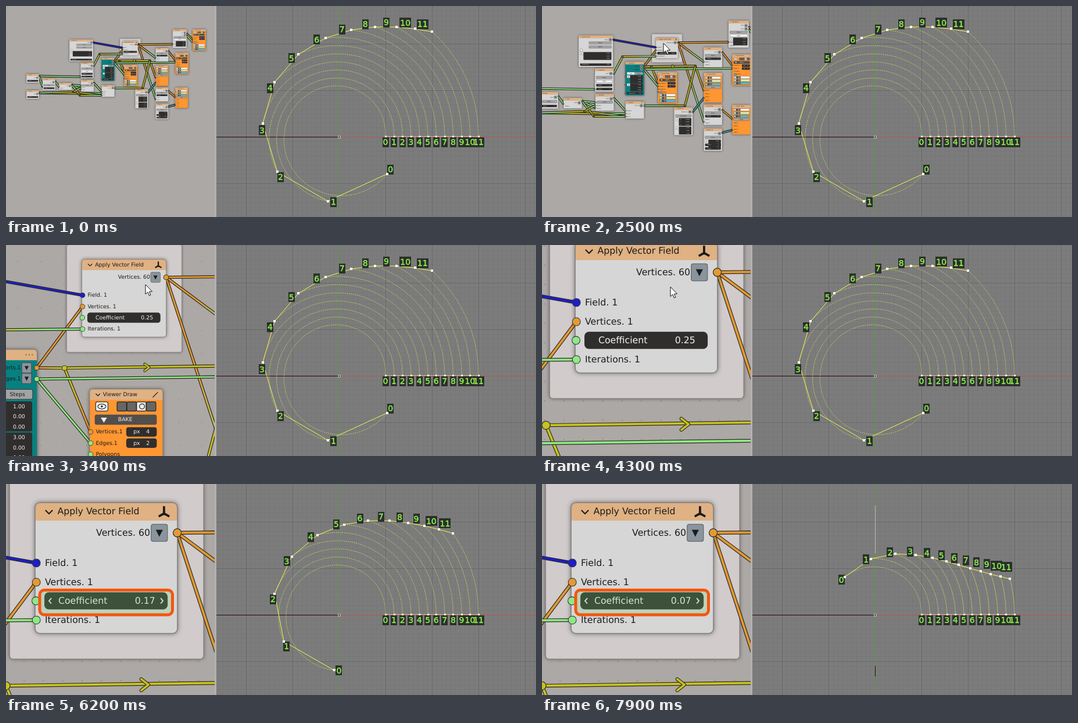
An HTML page with a canvas for the animation above (8000 ms loop, 912 by 363 pixels).

```html
<!DOCTYPE html>
<html lang="en">
<head>
<meta charset="utf-8">
<title>Vector field nodes</title>
<style>
html, body { margin: 0; width: 100%; height: 100%; overflow: hidden; background: #7c7c7c; }
canvas { display: block; width: 100vw; height: 100vh; }
</style>
</head>
<body>
<canvas id="stage" width="912" height="363"></canvas>
<script>
const ctx = document.getElementById('stage').getContext('2d');
const W = 912, H = 363, SPLIT = 359, LOOP = 8000;
const FONT = '"DejaVu Sans", sans-serif';
const WIRE = { o: '#e39a33', g: '#8ee886', y: '#c8c31e', b: '#1c1ec8', t: '#3aa3b0' };
const DARK = '#302e2d', GREY = '#a3a3a3', INK = '#1c1c1c', ORANGE = '#fe9632';

// Keyframes [time, ...values], linear between neighbours.
function track(t, keys) {
  if (t <= keys[0][0]) return keys[0].slice(1);
  for (let i = 1; i < keys.length; i++) {
    const a = keys[i - 1], b = keys[i];
    if (t <= b[0]) {
      const k = (t - a[0]) / (b[0] - a[0]);
      return b.slice(1).map((v, j) => a[j + 1] + (v - a[j + 1]) * k);
    }
  }
  return keys[keys.length - 1].slice(1);
}

const ZOOM = [[2200, .317], [2500, .46], [2700, .59], [2800, .59], [3100, 1], [3400, 1.75],
  [3600, 1.75], [3800, 2.25], [4100, 2.25], [4300, 2.95]].map(([t, s]) => [t, Math.log(s)]);
const OFFSET = [[.317, 144.8, 47], [.46, 114.8, 35], [1, 0, 0], [2.95, -463, -133]];
const PAN = [[4300, 0, 0], [4800, -7, 37]];
const POINTER = [[300, 821, 33], [1100, 242, 81], [1600, 230, 82], [1700, 230, 82], [2000, 209, 71],
  [2200, 209, 71], [2500, 209, 64], [2800, 210, 64], [3100, 247, 68], [3400, 240, 68],
  [4300, 221, 72], [4800, 215, 198]];
const COEFF = [[5000, .25], [5300, .24], [5800, .2], [6200, .17], [6700, .13], [7600, .08], [7900, .07]];
const STEP = [[4900, .1275], [5300, .1257], [5800, .108], [6200, .0937], [6700, .072], [7600, .046], [7900, .0391]];

let zoom = 1;

function box(x, y, w, h, r, fill, stroke) {
  ctx.beginPath();
  ctx.roundRect(x, y, w, h, r);
  if (fill) { ctx.fillStyle = fill; ctx.fill(); }
  if (stroke) { ctx.strokeStyle = stroke; ctx.stroke(); }
}

function poly(points, fill, stroke) {
  ctx.beginPath();
  points.forEach(([x, y]) => ctx.lineTo(x, y));
  if (fill) { ctx.closePath(); ctx.fillStyle = fill; ctx.fill(); }
  if (stroke) { ctx.strokeStyle = stroke; ctx.stroke(); }
}

function text(str, x, y, align = 'left', color = INK) {
  ctx.font = (zoom < 1.5 ? 4.9 : 5.35) + 'px ' + FONT;
  ctx.textAlign = align;
  ctx.textBaseline = 'middle';
  ctx.fillStyle = color;
  ctx.fillText(str, x, y + .2);
}

function dot(x, y, color) {
  ctx.beginPath();
  ctx.arc(x, y, 2.35, 0, 7);
  ctx.fillStyle = color;
  ctx.fill();
  ctx.lineWidth = Math.max(.35, .8 / zoom);
  ctx.strokeStyle = '#333';
  ctx.stroke();
}

// ---- wires: one colour letter per point ----
const wires = [
  ['bb', 16, 50, 177, 78.6],
  ['oo', 132, 150, 177, 89.8],
  ['gyg', 18, 177, 52, 113, 177, 111.9],
  ['oo', 259.2, 61, 449, 59],
  ['og', 259.2, 61, 356, 133],
  ['og', 259.2, 61, 356, 357],
  ['oyyo', 132, 150, 159.3, 150.2, 324, 148, 356, 240],
  ['yo', 159.3, 150.2, 185, 213],
  ['gg', 132, 161, 462, 157],
  ['gg', 132, 161, 185, 224],
  ['gyy', 132, 297, 285, 297, 324, 148],
  ['gg', 18, 268, 63, 316],
  ['tt', 314, 320, 356, 268],
  ['gg', -277, 232, -52, 236],
  ['gg', -277, 232, -258, 290],
  ['gyg', -277, 324, -60, 327, 63, 326],
  ['gyg', -277, 324, -90, 318, 63, 337]
].concat([
  ['gg', -189, 262, -169, 290],
  ['gg', -100, 280, -50, 305],
  ['gg', -100, 280, -50, 285],
  ['gyg', -100, 280, -55, 337, 63, 337],
  ['yg', -90, 318, -50, 296],
  ['oo', 424, 97, 462, 145],
  ['oo', 424, 313, 462, 345],
  ['tt', 424, 398, 462, 388],
  ['oo', 524, 2, 556, 34],
  ['gg', 524, 12, 556, 46]
]);

function eachLeg(fn) {
  for (const [kinds, ...p] of wires)
    for (let i = 0; i + 1 < kinds.length; i++)
      fn(p[2 * i], p[2 * i + 1], p[2 * i + 2], p[2 * i + 3], WIRE[kinds[i]], WIRE[kinds[i + 1]]);
}

function drawWires() {
  const core = (1.3 + .9 * zoom) / zoom;
  ctx.lineCap = 'round';
  eachLeg((x1, y1, x2, y2, c1, c2) => {
    const ramp = ctx.createLinearGradient(x1, y1, x2, y2);
    ramp.addColorStop(.3, c1);
    ramp.addColorStop(.7, c2);
    ctx.lineWidth = core + 2.4 / zoom;
    poly([[x1, y1], [x2, y2]], null, '#2c2922');
    ctx.lineWidth = core;
    poly([[x1, y1], [x2, y2]], null, ramp);
  });
  const arrow = [[238.2, 146.3], [242.4, 149.6], [238.2, 152.9]];
  ctx.lineWidth = core + 2 / zoom;
  poly(arrow, null, '#36322a');
  ctx.lineWidth = core * .9;
  poly(arrow, null, WIRE.y);
}

function drawSockets() {
  eachLeg((x1, y1, x2, y2, c1, c2) => { dot(x1, y1, c1); dot(x2, y2, c2); });
  dot(176.8, 100.7, WIRE.g);
  dot(62.3, 188, WIRE.o);
  dot(62.3, 219, WIRE.o);
  dot(62.3, 250, WIRE.g);
  dot(185, 235, WIRE.g);
  dot(185, 246, WIRE.t);
}

// ---- nodes ----
function card(x, y, w, h, title, body = '#d6d6d6') {
  ctx.save();
  ctx.shadowColor = 'rgba(0,0,0,.55)';
  ctx.shadowBlur = 3 + 2 * zoom;
  box(x, y, w, h, 2.8, body);
  ctx.restore();
  box(x, y, w, 10.5, [2.8, 2.8, 0, 0], '#dfb183');
  ctx.lineWidth = .6;
  box(x, y, w, h, 2.8, null, 'rgba(125,120,118,.75)');
  ctx.lineWidth = .7;
  poly([[x + 6, y + 4.4], [x + 8.1, y + 6.5], [x + 10.2, y + 4.4]], null, INK);
  text(title, x + 13, y + 5.3);
}

function menu(x, y) {
  box(x, y - 5, 9.5, 10, 1.2, '#89949c', '#555');
  poly([[x + 2.7, y - 1.8], [x + 6.8, y - 1.8], [x + 4.75, y + 2.3]], INK);
}

function output(name, right, y) {
  text(name, right - 16, y, 'right');
  menu(right - 15, y);
}

function field(x, y, w, name, value) {
  box(x, y - 4.6, w, 9.2, 2.3, DARK);
  text(name, x + 7, y, 'left', '#eee');
  text(value, x + w - 7, y, 'right', '#eee');
}

function button(x, y, w, name, fill) {
  box(x, y - 4.8, w, 9.6, 1.6, fill, '#444');
  text(name, x + w / 2, y, 'center');
}

function vector(x, y, w, values) {
  box(x, y - 5, 12, 10, 1, '#f4f4f4', '#444');
  poly([[x + 4, y + 1.5], [x + 8, y + 1.5], [x + 6, y - 2]], INK);
  box(x + 12.5, y - 5, w - 12.5, 29.5, 1.8, DARK);
  values.forEach((v, i) => text(v, x + w - 7, y + i * 10, 'right', '#eee'));
}

function swatch(x, y, w, color) {
  box(x, y - 4.5, w, 9, 1.5, color, '#222');
  box(x + 9, y - 4, 8, 8, 0, '#4a4a4a');
  box(x + 18, y - 4, 8, 8, 0, '#6b6b6b');
  box(x + 2, y - 2.5, 5, 5, 0, '#f2f2f2', '#333');
}

const SWATCHES = ['#fbfbfb', '#dcebb0', '#64b5cf'];

// One letter per row: output, input, dark field, grey/white button, vector, colours.
function plain(x, y, w, h, title, rows, body) {
  card(x, y, w, h, title, body);
  const gap = (h - 14) / rows.length;
  let tint = 0;
  [...rows].forEach((k, i) => {
    const cy = y + 12 + gap * (i + .5);
    if (k === 'o') output('Out.1', x + w, cy);
    if (k === 'i') text('Data.1', x + 6, cy);
    if (k === 'd') field(x + 5, cy, w - 10, 'Count', '1');
    if (k === 'b') button(x + 5, cy, w - 10, 'Mode', GREY);
    if (k === 'w') button(x + 5, cy, w - 10, 'Step', '#f0f0f0');
    if (k === 'v') vector(x + 5, cy, w - 10, ['0.00', '0.00', '1.00']);
    if (k === 'c') swatch(x + 5, cy, w - 10, SWATCHES[tint++]);
  });
}

function viewer(x, y) {
  card(x, y, 72, 117, 'Viewer Draw', ORANGE);
  poly([[x + 62, y + 8], [x + 67, y + 3]], null, INK);
  box(x + 6, y + 12.5, 12, 9, 1.5, '#f4f4f4', '#333');
  ctx.beginPath();
  ctx.ellipse(x + 12, y + 17, 4, 2.4, 0, 0, 7);
  ctx.stroke();
  box(x + 11, y + 16, 2, 2, 1, INK);
  for (let i = 0; i < 4; i++) box(x + 27 + i * 9.6, y + 12.5, 9.3, 9, 1, i === 2 ? '#eee' : '#666', '#222');
  box(x + 49, y + 14.5, 5, 5, 2.5, null, INK);
  box(x + 5, y + 25, 61, 10, 2, '#514e4c');
  text('BAKE', x + 35, y + 30, 'center', '#eee');
  poly([[x + 11, y + 28], [x + 17, y + 28], [x + 14, y + 33]], '#eee');
  ['Vertices.1', 'Edges.1', 'Polygons'].forEach((n, i) => text(n, x + 6, y + 42 + i * 11));
  field(x + 36, y + 42, 30, 'px', '4');
  field(x + 36, y + 53, 30, 'px', '2');
  box(x + 7, y + 71, 9, 8.5, 1, '#7f97a8', '#333');
  text('Matrix', x + 18, y + 75);
  SWATCHES.forEach((c, i) => swatch(x + 6, y + 86 + i * 11, 60, c));
}

function applyNode(t) {
  card(176.3, 43.4, 83, 76.3, 'Apply Vector Field');
  ctx.lineWidth = 1.3;
  poly([[251.5, 50.7], [251.5, 45.5]], null, INK);
  poly([[248.4, 51.5], [251.5, 49.7], [254.6, 51.5]], null, INK);
  ctx.lineWidth = .35;
  text(zoom < 1.5 ? 'Vertices.60' : 'Vertices. 60', 243.4, 61, 'right');
  menu(244, 61);
  const sep = zoom < 1.5 ? '.1' : '. 1';
  text('Field' + sep, 182, 78.6);
  text('Vertices' + sep, 182, 89.8);
  text('Iterations' + sep, 182, 111.9);
  box(181.7, 95.7, 71.9, 10, 2.6, DARK);
  text('Coefficient', 189.8, 100.7, 'left', '#f2f2f2');
  text(track(t, COEFF)[0].toFixed(2), 246.4, 100.7, 'right', '#f2f2f2');
  if (t >= 4700) {
    ctx.lineWidth = .6;
    poly([[185.8, 99.1], [184.4, 100.7], [185.8, 102.3]], null, '#f2f2f2');
    poly([[249.5, 99.1], [250.9, 100.7], [249.5, 102.3]], null, '#f2f2f2');
  }
}

function segmentNode() {
  card(62.3, 132, 70, 126, 'Segment', '#078080');
  for (let i = 0; i < 3; i++) box(121 + i * 3, 136.5, 1.2, 1.2, .6, '#735a44');
  output('Verts.1', 132.3, 150);
  output('Edges.1', 132.3, 160.5);
  button(68, 176, 30, 'Cuts', '#f4f4f4');
  button(98, 176, 30, 'Steps', GREY);
  vector(68, 188, 59.5, ['1.00', '0.00', '0.00']);
  vector(68, 218.5, 59.5, ['3.00', '0.00', '0.00']);
  field(68, 250, 59.5, 'Num cuts', '10');
}

function fieldNode() {
  card(-112.6, 34, 129, 118, 'Vector Field');
  output('Field.1', 16.4, 50);
  button(-74, 62, 84, 'Mode', GREY);
  button(-74, 77, 84, 'Falloff', GREY);
  box(-107, 85, 9, 9, 1, '#eee', '#333');
  vector(-107, 101, 117, ['0.00', '0.00', '0.00']);
  field(-107, 143, 117, 'Amplitude', '0.50');
}

function drawNodes(t) {
  fieldNode();
  plain(-51.7, 157.5, 70, 86.5, 'Iterations', 'obwdd');
  plain(-50, 253, 69.5, 63, 'Number', 'obii');
  plain(-258, 245, 69, 63, 'Range', 'obd');
  plain(-169, 268, 69, 39, 'List', 'oi');
  plain(-346, 221, 69, 47, 'Integer', 'od');
  plain(-346, 309, 69, 47, 'Integer', 'od');
  segmentNode();
  card(62.6, 280.5, 69.7, 64.5, 'Switch');
  poly([[122, 288], [125, 285], [123, 283.5], [127, 283]], null, INK);
  output('Out_0.1', 132.3, 297);
  ['State.1', 'A_0.1', 'B_0.1'].forEach((n, i) => text(n, 68, 316 + i * 10.5));
  viewer(184, 171);
  card(244.7, 303, 69.5, 104, 'Matrix In');
  output('Matrices.1', 314.2, 320);
  button(250, 335, 59, 'AxisAngle', GREY);
  vector(250, 348, 59, ['0.000', '-0.100', '0.000']);
  ['X', 'Y', 'Z'].forEach((n, i) => text(n, 268, 348 + i * 10, 'left', '#eee'));
  vector(250, 380, 59, ['0.00', '0.00', '1.00']);
  plain(355.5, 79, 69, 74, 'Index', 'obdii');
  plain(355.5, 174, 69, 111, 'Viewer Index', 'cccbiiii', ORANGE);
  plain(355.5, 293, 69, 76, 'List Item', 'obdii');
  plain(355.5, 382, 69, 84, 'Matrix In', 'obvdd');
  plain(448, -21, 76, 101, 'Transpose', 'oobwvii');
  viewer(462, 105);
  plain(462, 294, 69, 111, 'Viewer Index', 'cccbiiii', ORANGE);
  viewer(556, -22);
  applyNode(t);
}

function drawDots(a, b) {
  const gap = [11.3, 22.6, 113].find(g => g * zoom > 22);
  const px = gap * zoom, size = Math.min(2, .8 + zoom * .4);
  ctx.fillStyle = 'rgba(110,106,104,.45)';
  for (let x = ((a % px) + px) % px; x < SPLIT; x += px)
    for (let y = ((b % px) + px) % px; y < H; y += px) ctx.fillRect(x, y, size, size);
}

function drawEditor(t) {
  ctx.save();
  ctx.beginPath();
  ctx.rect(0, 0, SPLIT, H);
  ctx.clip();
  ctx.fillStyle = '#aca8a6';
  ctx.fillRect(0, 0, SPLIT, H);
  zoom = Math.exp(track(t, ZOOM)[0]);
  const [ox, oy] = track(zoom, OFFSET), [px, py] = track(t, PAN);
  drawDots(ox + px, oy + py);
  ctx.translate(ox + px, oy + py);
  ctx.scale(zoom, zoom);
  ctx.save();
  ctx.shadowColor = 'rgba(0,0,0,.5)';
  ctx.shadowBlur = 3 + zoom;
  box(161.4, 29, 113.2, 105.6, 2, '#d1cbcb');
  ctx.restore();
  ctx.lineWidth = .4;
  box(161.4, 29, 113.2, 105.6, 2, null, '#85807f');
  drawWires();
  ctx.lineCap = 'butt';
  drawNodes(t);
  drawSockets();
  ctx.restore();
  if (t >= 5000) {
    ctx.lineWidth = 5;
    box(58, 182.5, 228.5, 42.5, 8, 'rgba(106,198,106,.24)', '#f4560f');
  }
}

// ---- viewport ----
const CX = 573, CY = 225, UNIT = 80, COUNT = 12, ROUNDS = 60;

function trail(i, d) {
  let x = 1 + 2 * i / (COUNT - 1), y = 0;
  const pts = [[x, y]];
  for (let n = 0; n < ROUNDS; n++) {
    const k = d / (x * x + y * y);
    [x, y] = [x - y * k, y + x * k];
    pts.push([x, y]);
  }
  return pts;
}

const toScreen = ([x, y]) => [CX + x * UNIT, CY - y * UNIT];

function turn([x, y], a) {
  const c = Math.cos(a), s = Math.sin(a);
  return [x * c - y * s, x * s + y * c];
}

function drawLabels(spots) {
  ctx.fillStyle = '#2c2f2c';
  spots.forEach(([x, y], i) => {
    const w = i > 9 ? 20 : 11;
    ctx.fillRect(Math.round(x - w / 2), Math.round(y - 8.5), w, 17);
  });
  ctx.font = '14px ' + FONT;
  ctx.textAlign = 'center';
  ctx.textBaseline = 'alphabetic';
  ctx.fillStyle = ctx.strokeStyle = '#8ef650';
  ctx.lineWidth = .4;
  spots.forEach(([x, y], i) => {
    ctx.fillText(i, x, Math.round(y) + 5);
    ctx.strokeText(i, x, Math.round(y) + 5);
  });
}

function drawGrid() {
  ctx.fillStyle = '#7c7c7c';
  ctx.fillRect(SPLIT, 0, W - SPLIT, H);
  const lines = (step, color) => {
    ctx.fillStyle = color;
    for (let x = CX - Math.floor((CX - 362) / step) * step; x < W; x += step) ctx.fillRect(x, 0, 1, H);
    for (let y = CY % step; y < H; y += step) ctx.fillRect(362, y, W - 362, 1);
  };
  lines(8, '#777777');
  lines(80, '#666a6a');
  ctx.fillStyle = '#26060e';
  ctx.fillRect(362, CY, CX - 362, 1);
  ctx.fillStyle = '#b0564f';
  ctx.fillRect(CX, CY, W - CX, 1);
  ctx.fillStyle = '#56993f';
  ctx.fillRect(CX, 0, 1, H);
  ctx.fillStyle = '#b4b1b0';
  ctx.fillRect(SPLIT, 0, 3, H);
}

function drawView(t) {
  drawGrid();
  if (t >= 6300) {
    ctx.fillStyle = '#b9bab5';
    ctx.fillRect(CX, 37, 1, 82);
    ctx.fillStyle = '#141414';
    ctx.fillRect(CX, 313, 1, 18);
  }
  const d = track(t, STEP)[0], starts = [], ends = [];
  ctx.lineWidth = 1;
  for (let i = 0; i < COUNT; i++) {
    const pts = trail(i, d);
    const stride = d / pts[0][0] * UNIT;
    ctx.setLineDash([2, Math.min(1.6, stride * .5)]);
    poly(pts.map(toScreen), null, 'rgba(208,222,92,.85)');
    starts.push(toScreen(pts[0]));
    ends.push(pts[ROUNDS]);
  }
  ctx.setLineDash([2, 1]);
  poly([[653, 224.5], [813, 224.5]], null, '#e6ebb0');
  ctx.setLineDash([]);
  poly(ends.map(toScreen), null, '#f6f64e');
  drawLabels(starts.map(([x, y]) => [x, y + 9]));
  drawLabels(ends.map(p => toScreen(turn(p, .088))));
  ctx.fillStyle = '#fff';
  starts.forEach(([x]) => ctx.fillRect(Math.round(x) - 1, 223, 3, 3));
  ends.map(toScreen).forEach(([x, y]) => ctx.fillRect(Math.round(x) - 2, Math.round(y) - 2, 4, 4));
  ctx.lineWidth = 1;
  ctx.beginPath();
  ctx.arc(CX + .5, CY + .5, 2, 0, 7);
  ctx.fillStyle = '#444';
  ctx.fill();
  ctx.strokeStyle = '#e4e4e4';
  ctx.stroke();
}

function drawPointer(t) {
  if (t < 300 || t >= 5000) return;
  const [x, y] = track(t, POINTER);
  ctx.lineWidth = 1;
  ctx.lineJoin = 'round';
  const shape = [[0, 0], [0, 16.5], [3.8, 13], [6.5, 19], [9, 18], [6.4, 12.2], [11.6, 12], [0, 0]];
  poly(shape.map(p => [x + p[0], y + p[1]]), '#fff', '#111');
}

function frame(now) {
  const t = Math.floor(now % LOOP / 100) * 100;
  ctx.setTransform(1, 0, 0, 1, 0, 0);
  drawView(t);
  drawEditor(t);
  drawPointer(t);
  requestAnimationFrame(frame);
}
requestAnimationFrame(frame);
</script>
</body>
</html>
```
